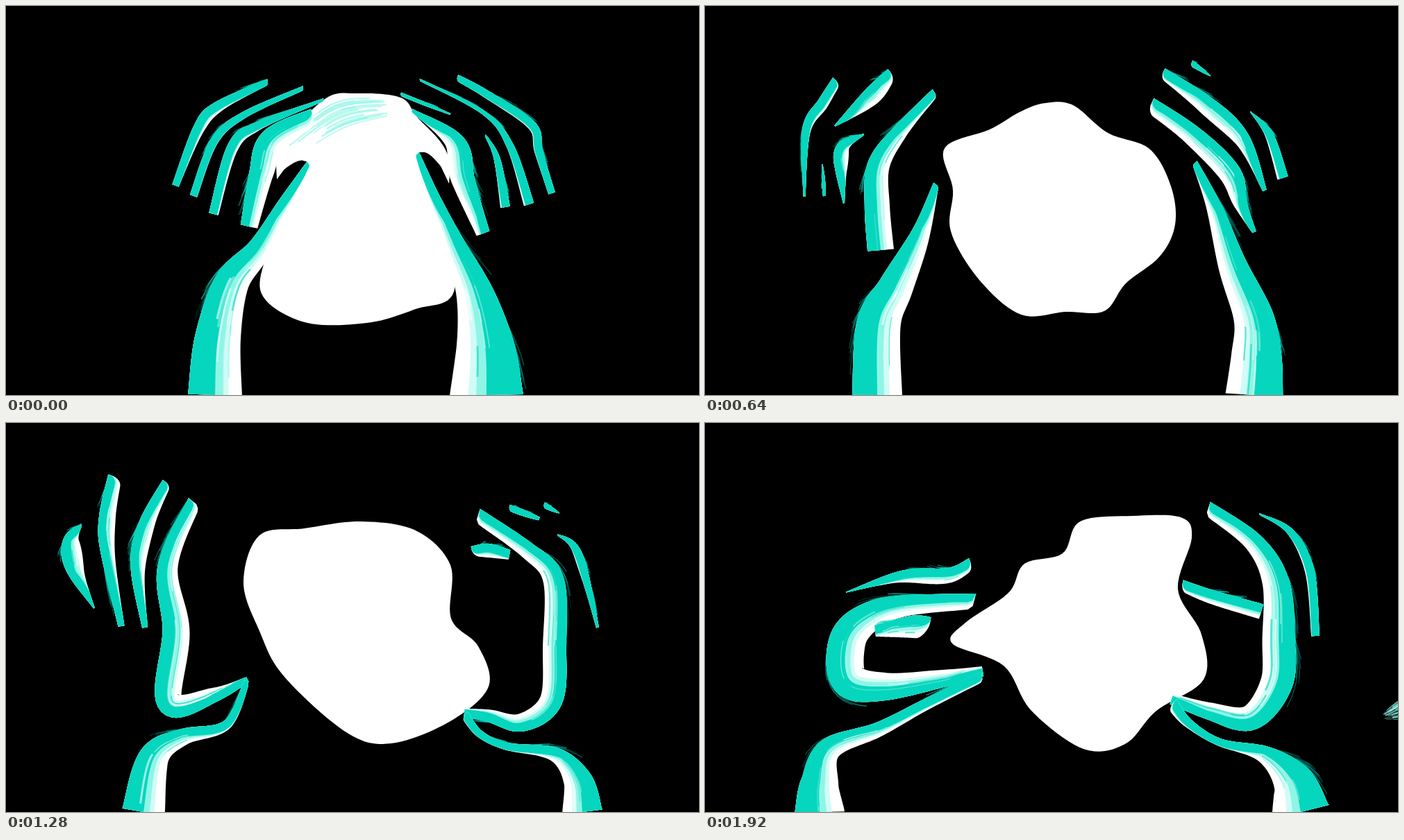
Recreate the animation shown at these times as an HTML page with a canvas. Size 998 by 561 pixels, loop 2 s.

```html
<!DOCTYPE html>
<html lang="en">
<head>
<meta charset="utf-8">
<title>Hands and light</title>
<style>
html, body { margin: 0; width: 100%; height: 100%; overflow: hidden; background: #000; }
canvas { display: block; width: 100vw; height: 100vh; }
</style>
</head>
<body>
<canvas id="c" width="998" height="561"></canvas>
<script>
const ctx = document.getElementById('c').getContext('2d');
const TEAL = '#06d6be', LIGHT = '#8ff5e6', PALE = '#d0fcf5', WHITE = '#fff';
const LOOP = 2000, STEP = 80, N = 80;
const poses = [];

const clamp = v => Math.max(0, Math.min(1, v));
const lerp = (a, b, f) => a + (b - a) * f;
const mix = (a, b, f) => a.map((p, i) => p.map((v, k) => lerp(v, b[i][k], f)));

// Catmull-Rom through flat tuples of size d, sampled n times
function spline(flat, d, n, closed) {
  const count = flat.length / d;
  const at = (i, k) => flat[(closed ? (i + count) % count : Math.max(0, Math.min(count - 1, i))) * d + k];
  return Array.from({ length: n }, (_, j) => {
    const u = closed ? j / n * count : j / (n - 1) * (count - 1);
    const i = Math.floor(u), f = u - i;
    return Array.from({ length: d }, (_, k) => {
      const a = at(i - 1, k), b = at(i, k), c = at(i + 1, k), e = at(i + 2, k);
      return b + 0.5 * f * (c - a + f * (2 * a - 5 * b + 4 * c - e + f * (3 * (b - c) + e - a)));
    });
  });
}

// A stroke is [tip, middle and base width], [key points of its spine]
function strokes(parts) {
  const out = {};
  for (const name in parts) {
    const [width, spine] = parts[name], w = spline(width, 1, N);
    out[name] = spline(spine, 2, N).map((p, i) => [...p, Math.max(0, w[i][0])]);
  }
  return out;
}

function pose(time, blob, left, right) {
  poses.push({ time, blob: spline(blob, 2, 160, true), left: strokes(left), right: strokes(right) });
}

// p index and palm, t thumb and arm, f2-f4 other fingers, e extra edge, w dry wash
pose(0, [505,126, 568,132, 592,160, 636,215, 636,300, 645,412, 590,437, 520,457, 430,456, 368,415, 378,345, 390,270, 395,205, 458,135], {
  f4: [[8,18,10], [378,109, 306,145, 277,178, 244,259]],
  f3: [[6,11,11], [429,118, 343,157, 300,195, 270,274]],
  f2: [[4,16,14], [458,135, 363,173, 326,205, 299,300]],
  p: [[26,38,25], [445,160, 385,192, 368,240, 350,318]],
  t: [[6,42,78], [436,226, 404,280, 365,350, 325,400, 305,480, 301,561]],
  w: [[26,40,28], [550,146, 480,158, 410,205]]
}, {
  f4: [[9,13,10], [649,103, 690,126, 757,172, 767,210, 786,270]],
  f3: [[3,8,15], [595,106, 688,154, 726,202, 753,286]],
  f2: [[2,9,14], [690,186, 707,220, 719,290]],
  e: [[5,5,2], [568,127, 640,156]],
  p: [[4,36,20], [584,150, 645,195, 658,250, 687,328]],
  t: [[6,42,106], [592,212, 617,277, 645,345, 675,415, 690,490, 692,561]]
});

pose(400, [505,139, 565,152, 625,205, 668,285, 677,345, 627,385, 590,440, 535,455, 455,446, 385,390, 356,330, 360,240, 390,194, 455,155], {
  f4: [[14,9,1], [230,110, 205,126, 171,188, 163,260]],
  f3: [[15,15,1], [300,115, 240,147, 203,173]],
  f2: [[8,24,4], [301,146, 253,180, 229,215, 233,297]],
  e: [[1,9,9], [193,203, 200,265, 194,300]],
  p: [[14,27,30], [362,133, 303,198, 278,250, 278,310, 277,352]],
  t: [[12,52,86], [357,230, 340,310, 300,385, 262,440, 262,500, 268,561]]
}, {
  f4: [[11,7,1], [684,86, 715,107, 757,143]],
  e: [[2,12,13], [776,160, 810,220, 825,268]],
  f3: [[14,12,17], [645,97, 692,126, 766,190, 787,284]],
  p: [[10,32,18], [645,124, 708,176, 744,226, 750,300, 757,337]],
  t: [[15,55,79], [668,238, 690,300, 725,375, 757,425, 764,490, 760,561]]
});

pose(640, [490,140, 530,143, 580,183, 640,206, 671,260, 677,315, 655,361, 606,400, 575,440, 520,441, 455,445, 395,395, 354,325, 357,265, 345,205, 410,178, 455,152], {
  f4: [[14,16,3], [190,107, 170,140, 146,180, 143,275]],
  f3: [[15,26,2], [269,96, 240,130, 187,173]],
  f2: [[2,22,2], [229,185, 200,202, 196,235, 200,285]],
  e: [[1,5,4], [169,228, 172,274]],
  p: [[12,32,38], [332,124, 282,180, 250,230, 248,290, 253,352]],
  t: [[8,50,72], [333,256, 310,330, 275,405, 250,460, 248,561]]
}, {
  f4: [[9,6,1], [700,82, 728,101]],
  e: [[1,12,16], [785,152, 812,185, 832,248]],
  f3: [[15,28,6], [658,96, 718,140, 774,193, 806,266]],
  p: [[22,32,6], [640,142, 700,185, 755,240, 771,285, 791,326]],
  t: [[8,50,83], [705,225, 733,290, 760,375, 790,450, 794,505, 791,561]]
});

pose(1040, [475,149, 540,175, 640,200, 658,230, 656,288, 704,336, 690,388, 640,412, 570,457, 490,455, 425,395, 363,338, 365,260, 405,190], {
  f4: [[1,29,5], [138,136, 117,165, 117,200, 135,284]],
  f3: [[24,20,3], [178,73, 172,135, 158,188, 170,291]],
  f2: [[1,13,6], [235,149, 194,194, 193,245, 202,304]],
  p: [[12,34,50], [292,122, 238,220, 242,290, 254,395]],
  t: [[6,54,77], [361,303, 325,380, 272,435, 243,485, 245,561]]
}, {
  f4: [[1,9,1], [789,120, 825,165, 855,239]],
  f3: [[18,30,2], [704,104, 748,128, 788,160, 817,202, 840,254]],
  f2: [[16,13,8], [658,171, 708,170, 758,191, 817,267]],
  p: [[8,38,8], [640,203, 708,212, 768,258, 788,325, 790,388, 735,388, 700,350, 676,348]],
  t: [[25,36,42], [684,370, 716,425, 765,455, 800,480, 810,561]]
});

pose(1280, [510,142, 590,155, 640,205, 641,282, 680,322, 695,380, 640,430, 555,462, 490,446, 400,365, 365,300, 342,230, 365,162, 430,152], {
  f4: [[2,30,2], [109,146, 94,170, 101,215, 127,267]],
  f3: [[20,24,9], [157,76, 146,135, 147,190, 166,293]],
  f2: [[14,25,8], [232,85, 203,145, 190,210, 200,295]],
  p: [[20,40,8], [272,112, 233,207, 245,300, 236,403, 300,392, 348,370]],
  t: [[8,24,62], [347,372, 318,435, 255,453, 213,483, 198,561]]
}, {
  f4: [[2,13,4], [794,161, 818,178, 835,225, 852,295]],
  e: [[8,6,1], [774,118, 797,130]],
  f3: [[9,9,5], [724,122, 768,138]],
  f2: [[14,20,14], [670,185, 695,184, 725,190]],
  p: [[20,34,12], [677,132, 750,183, 788,225, 790,320, 785,400, 742,432, 695,422, 660,418]],
  t: [[12,14,58], [660,420, 682,448, 720,466, 790,478, 823,515, 830,561]]
});

pose(1600, [600,120, 660,114, 692,160, 670,235, 690,315, 717,368, 665,410, 610,450, 565,463, 485,425, 440,370, 372,328, 385,290, 460,250, 495,190, 555,163], {
  f2: [[18,20,1], [387,208, 360,232, 290,232, 228,242]],
  e: [[16,16,10], [327,300, 278,300]],
  p: [[14,52,14], [388,265, 280,282, 222,300, 203,340, 208,385, 285,380, 352,360, 394,355]],
  t: [[14,24,54], [394,362, 370,390, 270,428, 205,455, 180,510, 176,561]]
}, {
  f4: [[2,13,15], [808,138, 843,163, 873,215, 880,305]],
  f2: [[14,24,30], [685,232, 760,253, 800,263]],
  p: [[20,42,13], [713,118, 790,180, 818,230, 818,300, 810,390, 775,428, 722,418, 674,405]],
  t: [[18,14,48], [674,409, 690,434, 735,465, 790,488, 832,520, 842,561]],
  w: [[10,30,40], [1060,426, 1110,405]]
});

pose(1920, [615,134, 685,136, 701,165, 681,240, 715,305, 718,370, 650,415, 605,463, 545,470, 470,415, 430,350, 356,318, 375,288, 437,245, 460,203, 515,188, 540,142], {
  f2: [[16,22,1], [384,202, 350,220, 280,222, 203,244]],
  e: [[32,32,16], [324,296, 298,294, 245,300]],
  p: [[22,54,14], [391,257, 285,264, 233,282, 205,315, 208,370, 260,380, 345,368, 400,358]],
  t: [[14,26,72], [401,365, 320,405, 250,442, 180,470, 165,520, 165,561]]
}, {
  f4: [[2,13,12], [798,131, 843,157, 871,215, 879,307]],
  f2: [[16,20,22], [686,234, 730,251, 801,272]],
  p: [[20,48,16], [722,122, 790,172, 822,230, 826,310, 823,375, 785,425, 725,415, 672,398]],
  t: [[18,15,84], [672,404, 695,432, 740,460, 805,478, 845,515, 858,561]],
  w: [[10,30,40], [978,424, 1030,405]]
});

function random(seed) {
  let s = seed * 7919 + 17;
  return () => (s = s * 16807 % 2147483647) / 2147483647;
}

function fill(pts, color) {
  ctx.fillStyle = color;
  ctx.beginPath();
  pts.forEach(p => ctx.lineTo(p[0], p[1]));
  ctx.fill();
}

// Adds edges to a spine: the lit side rounds off at the tip, thin parts are all shade
function ribbon(spine, side) {
  let run = 0;
  return spine.map(([x, y, w], i) => {
    const a = spine[Math.max(0, i - 1)], b = spine[Math.min(N - 1, i + 1)];
    const dx = b[0] - a[0], dy = b[1] - a[1], len = Math.hypot(dx, dy) || 1;
    if (i) run += Math.hypot(x - a[0], y - a[1]);
    const nx = -dy / len * side, ny = dx / len * side;
    const cap = Math.sqrt(1 - (1 - clamp(run / (w * .6 + 1))) ** 2);
    return {
      x: x + nx * w / 2, y: y + ny * w / 2, nx, ny,
      w: w * cap, full: w, m: .5 + .5 * clamp((24 - w) / 14)
    };
  });
}

const across = (p, px) => [p.x - p.nx * px, p.y - p.ny * px];
function band(r, from, to, color) {
  const edge = k => r.map(p => across(p, p.w * k(p)));
  fill([...edge(from), ...edge(to).reverse()], color);
}

function line(r, start, count, offset, width, color, alpha) {
  ctx.globalAlpha = alpha;
  ctx.strokeStyle = color;
  ctx.lineWidth = width;
  ctx.beginPath();
  r.slice(start, start + count).forEach((p, i) => ctx.lineTo(...across(p, offset(p, i / count))));
  ctx.stroke();
  ctx.globalAlpha = 1;
}

// Streaks in the paint and dry bristles leaving the shaded edge
function texture(r, rnd) {
  const start = () => Math.floor(rnd() * N * .8);
  for (let i = 0; i < 16; i++) {
    const s = start(), k = rnd() * .8 - .25, size = r[s].full / 14;
    if (r[s].full < 20) continue;
    line(r, s, 10 + rnd() * 14, p => p.w * clamp(p.m + (1 - p.m) * k), rnd() * size, [LIGHT, PALE, WHITE, TEAL][i % 4], .6);
  }
  for (let clump = 0; clump < 2; clump++) {
    const s = start();
    for (let i = 0; i < 8; i++) {
      const far = rnd() * 9;
      line(r, s + Math.floor(rnd() * 8), 5 + rnd() * 8, (p, u) => -far * u * Math.min(1, p.full / 30), .5 + rnd(), TEAL, .4);
    }
  }
}

function wash(r, rnd) {
  for (let i = 0; i < 26; i++) {
    const k = rnd();
    line(r, Math.floor(rnd() * 30), 30 + rnd() * 30, p => p.full * k, (.5 + rnd() * 2.5) * r[40].full / 40, LIGHT, .6);
  }
}

function paint(r, rnd) {
  const none = () => 0, all = () => 1, past = g => p => p.m + (1 - p.m) * g;
  band(r, none, all, WHITE);
  band(r, none, past(.5), PALE);
  band(r, none, past(.28), LIGHT);
  band(r, none, past(0), TEAL);
  texture(r, rnd);
}

// The dark thumb lies along the shaded side of the arm's rim
function thumb(r) {
  const top = r.slice(0, N * .42);
  fill([...top.map(p => across(p, 0)),
    ...top.map((p, i) => across(p, -20 * Math.sqrt(clamp(i / 8)))).reverse()], '#000');
}

const LAYERS = [['t', thumb], ['w', wash], ['p', paint], ['f4', paint], ['f3', paint], ['f2', paint], ['e', paint], ['t', paint]];
const thin = s => s.map(([x, y]) => [x, y, 0]);

function draw(t) {
  let i = 0;
  while (i < poses.length - 2 && t >= poses[i + 1].time) i++;
  const from = poses[i], to = poses[i + 1], f = (t - from.time) / (to.time - from.time);
  ctx.fillStyle = '#000';
  ctx.fillRect(0, 0, 998, 561);
  fill(mix(from.blob, to.blob, f), WHITE);
  LAYERS.forEach(([name, brush], n) => ['left', 'right'].forEach((hand, h) => {
    const a = from[hand][name], b = to[hand][name];
    if (!(a || b) || !a && f === 0 || !b && f === 1) return;
    brush(ribbon(mix(a || thin(b), b || thin(a), f), h ? -1 : 1), random(1 + n * 2 + h + t));
  }));
}

function tick() {
  draw(Math.floor(performance.now() % LOOP / STEP) * STEP);
  requestAnimationFrame(tick);
}
tick();
</script>
</body>
</html>
```
